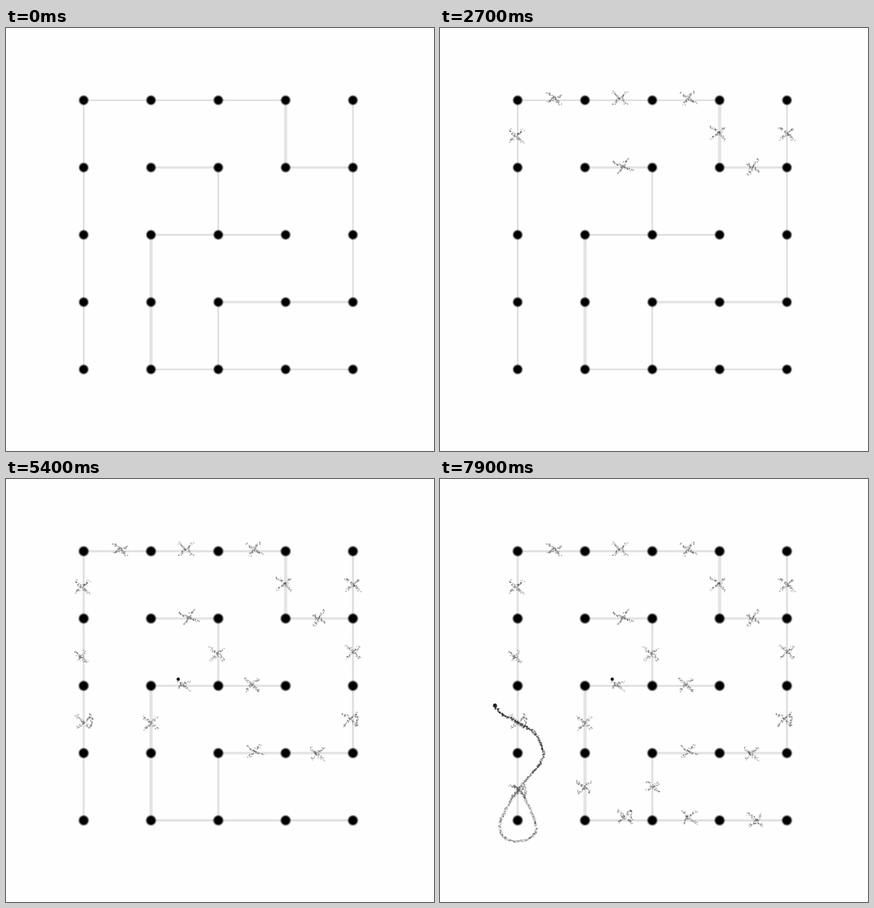
An HTML page with a canvas that plays this animation: 584 by 578 pixels, repeating every 8000 ms.

```html
<!DOCTYPE html>
<html lang="en">
<head>
<meta charset="utf-8">
<title>Dots and crossings</title>
<style>
html, body { margin: 0; width: 100%; height: 100%; overflow: hidden; background: #fefefe; }
canvas { display: block; }
</style>
</head>
<body>
<canvas id="stage" width="584" height="578"></canvas>
<script>
const ctx = document.getElementById('stage').getContext('2d');
const LOOP = 8000, STEP = 100, SOFTEN = 4000;
const gx = i => 106 + i * 91.85;
const gy = j => 98.7 + j * 91.95;

// Rows of flat and upright walls in turn; = and H are wide
const maze = [
  '--- ', '|  H|', ' = =', '| | |', ' -- ', '|H  |', '  ==', '|H|  ', ' ---'
];
const walls = maze.flatMap((row, r) => [...row].flatMap((mark, i) => {
  if (mark === ' ') return [];
  const j = r >> 1, up = r % 2;
  return [{ mark, x0: gx(i), y0: gy(j), x1: gx(i + 1 - up), y1: gy(j + up) }];
}));

// Per wall: shift from its middle, then optional half arms of both strokes
const shapes = [
  [4, -2, 9, 9, 9, -4], [2, -2.7], [4, -2.7, 11, 7, 7, -9],
  [-1, 3], [-2.5, -1], [0, 0],
  [6, -1.5, 14, 6, 6, -10], [0, 0, 8, 5, 7, -11],
  [-4, 5, 9, 8, 5, -6], [-2, 3], [0, 0],
  [-2, -1.5, 8, 7, 8, -4], [1, -1.5],
  [0, 2], [-1, 5], [-4, 0],
  [4, -3, 11, 6, 8, -8], [-2, 1],
  [0, 6], [-2, 1], [1, 0, 8, 7, 8, -5],
  [8, -5], [5, -4], [2, 0]
];
// Extra rest before a cross, by its index
const rests = { 1: 100, 3: 200, 5: 100, 8: 200, 9: 100, 11: 200, 15: 200, 16: 200, 19: 100 };
// Time between the two strokes where it is not one step
const gaps = { 7: 200, 9: 0, 10: 200, 14: 200, 17: 0 };
const hooked = new Set([13, 15, 18, 21]);

let clock = 500;
const crosses = walls.map((w, i) => {
  clock += 200 + (rests[i] ?? 0);
  const [dx, dy, ax = 10, ay = 9, bx = 9, by = -8] = shapes[i];
  return {
    i, ax, ay, bx, by,
    x: (w.x0 + w.x1) / 2 + dx, y: (w.y0 + w.y1) / 2 + dy,
    first: clock, second: clock + (gaps[i] ?? STEP)
  };
});

const knots = [
  [75, 310], [82, 319], [106, 333], [128, 346], [139, 366], [138, 386],
  [104, 428], [82, 470], [88, 490], [106, 495],
  [125, 489], [130.5, 472], [113, 431], [100, 419]
];
const THREAD_START = 7300, THREAD_STEPS = 7;

function random(seed) {
  let s = seed * 7919 >>> 0;
  return () => {
    s = (s * 1664525 + 1013904223) % 4294967296;
    return s / 4294967296;
  };
}

function spline(pts) {
  const out = [], n = pts.length;
  for (let i = 0; i < n - 1; i++) {
    const p = [-1, 0, 1, 2].map(k => pts[Math.min(n - 1, Math.max(0, i + k))]);
    const steps = Math.ceil(Math.hypot(p[2][0] - p[1][0], p[2][1] - p[1][1]) / 0.7);
    for (let s = 0; s < steps; s++) {
      const t = s / steps;
      out.push([0, 1].map(d => {
        const [a, b, c, e] = p.map(q => q[d]);
        return b + t * ((c - a) + t * ((2 * a - 5 * b + 4 * c - e) + t * (3 * b - a - 3 * c + e))) / 2;
      }));
    }
  }
  return out;
}
const thread = spline(knots);

function dab(x, y, rnd, spread, size, alpha) {
  const s = size * (0.7 + rnd() * 0.6);
  ctx.fillStyle = `rgba(35,35,35,${alpha})`;
  ctx.fillRect(x + (rnd() - 0.5) * spread - s / 2, y + (rnd() - 0.5) * spread - s / 2, s, s);
}

function stroke(x0, y0, x1, y1, seed) {
  const rnd = random(seed);
  const len = Math.hypot(x1 - x0, y1 - y0);
  const bend = (rnd() - 0.5) * 4;
  for (let d = 0; d <= len; d += 0.75) {
    const t = d / len, off = bend * Math.sin(Math.PI * t);
    const x = x0 + (x1 - x0) * t - (y1 - y0) / len * off;
    const y = y0 + (y1 - y0) * t + (x1 - x0) / len * off;
    dab(x, y, rnd, 3.8, 1.4, 0.36);
  }
}

function disc(x, y, r, color) {
  ctx.fillStyle = color;
  ctx.beginPath();
  ctx.arc(x, y, r, 0, 2 * Math.PI);
  ctx.fill();
}

function drawWalls(soft) {
  for (const { mark, x0, y0, x1, y1 } of walls) {
    const wide = mark === 'H' || mark === '=';
    ctx.lineWidth = mark === 'H' ? 4.4 : wide ? 3.4 : soft ? 2.9 : 2.1;
    ctx.strokeStyle = wide ? '#e4e4e4' : soft ? '#e1e1e1' : '#dcdcdc';
    ctx.beginPath();
    ctx.moveTo(x0, y0);
    ctx.lineTo(x1, y1);
    ctx.stroke();
  }
}

function drawDots(soft) {
  const r = soft ? 8 : 7.6;
  for (let j = 0; j < 5; j++) {
    for (let i = 0; i < 5; i++) {
      const x = gx(i), y = gy(j);
      const g = ctx.createRadialGradient(x, y, 0, x, y, r);
      g.addColorStop(0, '#000');
      g.addColorStop(0.62, '#000');
      g.addColorStop(0.84, 'rgba(0,0,0,.4)');
      g.addColorStop(1, 'rgba(0,0,0,0)');
      disc(x, y, r, g);
    }
  }
}

function drawCross({ i, x, y, ax, ay, bx, by, first, second }, time) {
  if (time < first) return;
  const seed = 3 * i + 1;
  stroke(x - ax, y - ay, x + ax, y + ay, seed);
  if (i === 11) disc(235, 273.5, 2.2, '#111');
  if (time < second) return;
  stroke(x + bx, y + by, x - bx, y - by, seed + 1);
  if (hooked.has(i)) stroke(x + bx, y + by, x + ax, y + ay, seed + 2);
}

function drawThread(time) {
  if (time < THREAD_START) return;
  const done = Math.min(1, ((time - THREAD_START) / STEP + 1) / THREAD_STEPS);
  const count = Math.floor(thread.length * Math.pow(done, 1.2));
  const rnd = random(91);
  disc(75, 309.5, 2.7, '#222');
  for (let i = 0; i < count; i++) {
    const [x, y] = thread[i];
    const alpha = 0.26 + 0.5 * Math.max(0, 1 - i / thread.length / 0.55);
    dab(x, y, rnd, 3.4, 1.5, alpha);
    dab(x, y, rnd, 2.4, 1.3, alpha * 0.5);
  }
}

function draw(time) {
  const soft = time >= SOFTEN;
  ctx.fillStyle = '#fefefe';
  ctx.fillRect(0, 0, 584, 578);
  drawWalls(soft);
  drawDots(soft);
  crosses.forEach(c => drawCross(c, time));
  drawThread(time);
}

const begin = performance.now();
let shown = -1;
function tick() {
  const time = Math.floor((performance.now() - begin) % LOOP / STEP) * STEP;
  if (time !== shown) draw(shown = time);
  requestAnimationFrame(tick);
}
tick();
</script>
</body>
</html>
```
